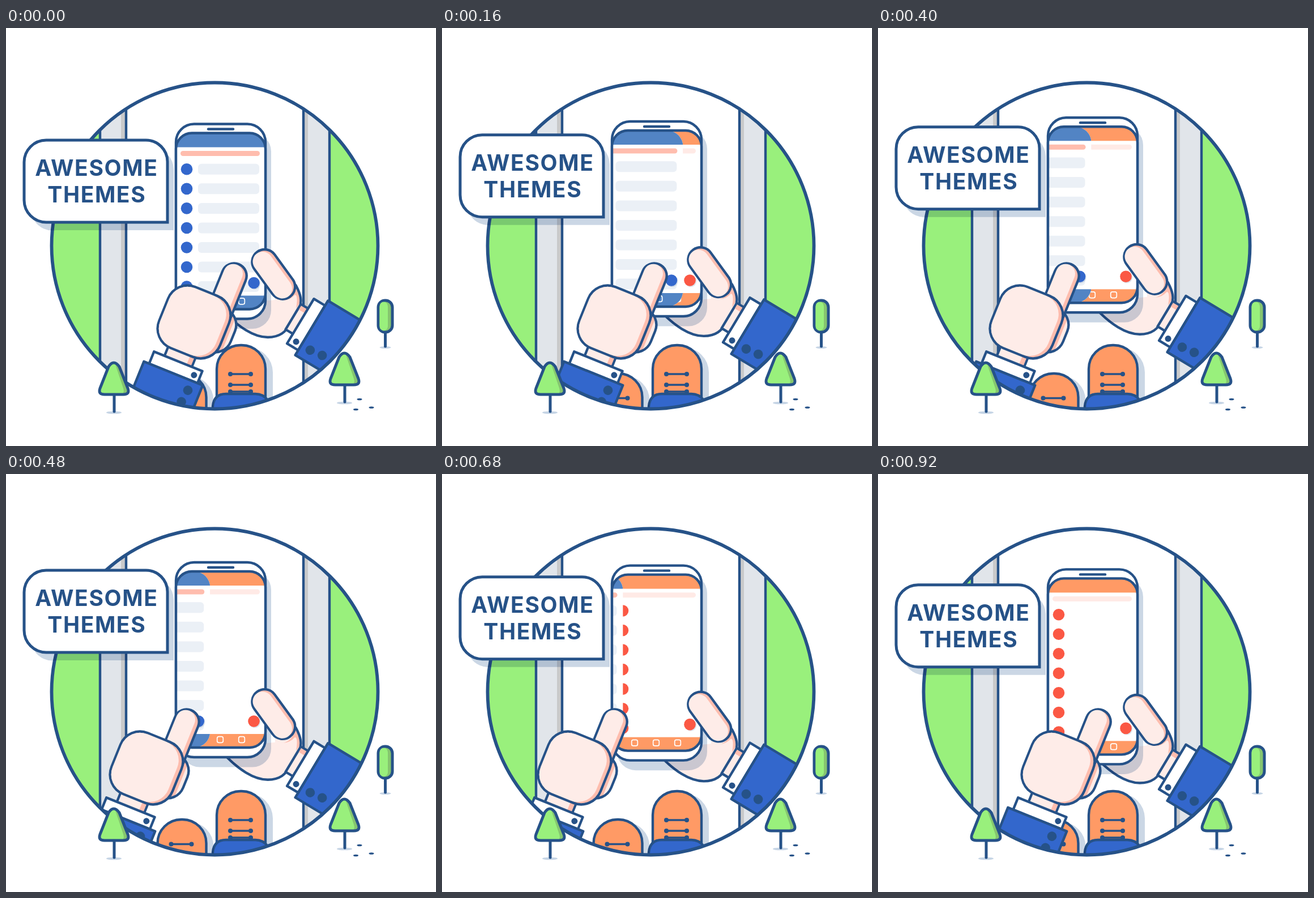
An HTML page that plays this animation: 759x738 px, repeating every 0.96 s.

```html
<!DOCTYPE html>
<html lang="en">
<head>
<meta charset="utf-8">
<title>Awesome themes</title>
<style>
  html, body { margin: 0; width: 100%; height: 100%; overflow: hidden; background: #fff; }
  svg { display: block; width: 759px; height: 738px; }
  .ink { stroke: #265288; stroke-width: 4.4; stroke-linejoin: round; stroke-linecap: round; }
  .bold { stroke-width: 5; }
  .fine { stroke-width: 3.4; }
  .dark { fill: #265288; }
  .shadow { fill: #cbd7e5; mix-blend-mode: multiply; }
  .green { fill: #99f07c; }
  .leafShade { fill: #85c56f; }
  .skin { fill: #feece8; }
  .blush { fill: #ffbdae; }
  .blue { fill: #3367cc; }
  .shoe { fill: #ff9a65; }
  .white { fill: #fff; }
  .none { fill: none; }
  text { font: 700 39px Inter, "Open Sans", sans-serif; letter-spacing: 1.6px; text-anchor: middle; }
</style>
</head>
<body>
<svg viewBox="0 0 759 738">
  <defs>
    <clipPath id="disc"><circle cx="368.5" cy="384.5" r="288"/></clipPath>
    <clipPath id="screen"><rect x="300" y="185.5" width="158" height="311" rx="28"/></clipPath>
    <clipPath id="knuckle"><rect x="10" y="-42" width="63" height="80" rx="30"/></clipPath>
    <g id="arm">
      <rect class="white ink" x="-46" y="-23" width="92" height="23"/>
      <circle class="dark" cx="35" cy="-11" r="5.5"/>
      <rect class="blue ink" x="-56" width="112" height="130"/>
      <circle class="dark" cx="35" cy="18" r="8.3"/>
      <circle class="dark" cx="32" cy="41" r="8.3"/>
    </g>
    <g id="lace">
      <path class="ink fine" d="M396 0H432"/>
      <circle class="dark" cx="396" r="4"/><circle class="dark" cx="432" r="4"/>
    </g>
    <g id="shoe">
      <path class="shadow" d="M384 690V608A43 43 0 0 1 471 608V690Z"/>
      <path class="shoe ink" d="M372 690V602A42 42 0 0 1 414 560H416A42 42 0 0 1 458 602V690Z"/>
    </g>
    <g id="tree">
      <ellipse cx="190.5" cy="679" rx="13.5" ry="2.3" fill="#c5d4e5"/>
      <path class="ink bold" d="M191 648V677"/>
      <path class="green" d="M181 598Q190 584 200 598L215 636Q219 647 207 647H174Q162 647 166 636Z"/>
      <path class="leafShade" d="M192 591Q197 592 200 598L215 636Q219 647 207 647H203Q210 645 207 636Z"/>
      <path class="none ink bold" d="M181 598Q190 584 200 598L215 636Q219 647 207 647H174Q162 647 166 636Z"/>
    </g>
  </defs>

  <g clip-path="url(#disc)">
    <rect class="white" width="759" height="738"/>
    <path class="green" d="M60 90H166V690H60ZM571 90H670V690H571Z"/>
    <path fill="#e1e5ea" d="M166 90H212V690H166ZM525 90H571V690H525Z"/>
    <path fill="#c9c9ca" d="M203 90H211V690H203ZM526 90H533V690H526Z"/>
    <path class="ink" d="M166 90V690M212 90V690M525 90V690M571 90V690"/>

    <use href="#shoe"/>
    <use href="#lace" y="611"/><use href="#lace" y="630"/><use href="#lace" y="642"/>
    <path class="blue ink" d="M365 685V668Q367 646 388 646H440Q454 646 462 657V685Z"/>
    <g transform="translate(-104.5 50)">
      <use href="#shoe"/><use href="#lace" y="603.5"/><use href="#lace" y="622.5"/>
    </g>

    <g id="palm">
      <path class="skin" d="M375 490C410 531 440 546 462 546C484 546 494 536 502 522L518 494C523 482 520 470 512 455L475 410V480Z"/>
      <path class="blush" d="M490 481Q513 475 506 444L514 458Q521 472 518 486L512 495Q516 472 510 471Q502 480 490 481Z"/>
      <path class="none ink" d="M375 490C410 531 440 546 462 546C484 546 494 536 502 522L518 494C523 482 520 470 512 455L475 410"/>
      <g transform="translate(539.5 529.5) rotate(-59)">
        <rect class="skin ink" x="-26" y="-38" width="52" height="20"/>
        <rect class="blush" x="16" y="-36" width="8" height="18"/>
        <use href="#arm" transform="scale(-1 1)"/>
      </g>
    </g>

    <g id="phone">
      <rect class="shadow" x="309" y="185" width="159" height="346" rx="33"/>
      <rect class="white ink" x="300" y="169.5" width="158" height="344" rx="32"/>
      <g clip-path="url(#screen)">
        <g id="newPage"></g>
        <g id="oldPage"><g id="oldBody" clip-path="url(#screen)"></g></g>
      </g>
      <rect class="none ink" x="300" y="185.5" width="158" height="311" rx="28"/>
      <path class="ink" d="M357 178.5H401"/>
    </g>

    <g id="thumb">
      <g transform="translate(472.3 434.8) rotate(-36)">
        <rect class="blush ink" x="-22" y="-49" width="44" height="98" rx="22"/>
        <rect class="skin" x="-20" y="-47" width="35" height="94" rx="18"/>
      </g>
    </g>

    <g id="hand">
      <g transform="translate(332 519) rotate(22)">
        <rect class="skin" x="10" y="-42" width="63" height="80" rx="30"/>
        <path class="blush" clip-path="url(#knuckle)" d="M50 -50H65V25Q64 42 48 50H30Z"/>
        <rect class="none ink" x="10" y="-42" width="63" height="80" rx="30"/>
        <rect class="blush ink" x="13" y="-124" width="44" height="120" rx="22"/>
        <rect class="skin" x="15" y="-122" width="34" height="110" rx="17"/>
        <rect class="skin ink" x="-26" y="45" width="52" height="31"/>
        <rect class="blush" x="16" y="45" width="8" height="29"/>
        <rect class="blush ink" x="-58" y="-58" width="116" height="116" rx="37"/>
        <rect class="skin" x="-56" y="-56" width="106" height="112" rx="35"/>
        <use href="#arm" y="98"/>
      </g>
    </g>
  </g>
  <circle class="none ink" style="stroke-width:5.8" cx="368.5" cy="384.5" r="288"/>

  <use href="#tree"/>
  <use href="#tree" x="407" y="-17"/>
  <ellipse cx="669.5" cy="564" rx="10" ry="2" fill="#c5d4e5"/>
  <path class="ink bold" d="M669.5 538V562"/>
  <rect class="leafShade ink bold" x="657" y="481" width="25" height="56" rx="12"/>
  <rect class="green" x="659.4" y="483.4" width="14.6" height="51" rx="8"/>
  <g class="dark">
    <ellipse cx="624" cy="655.5" rx="4.5" ry="1.8"/>
    <ellipse cx="617.5" cy="673.5" rx="4.5" ry="1.8"/>
    <ellipse cx="645" cy="670" rx="4.5" ry="1.8"/>
  </g>

  <g id="bubble">
    <path class="shadow" d="M82 212H257A38 38 0 0 1 296 250V357H88A38 38 0 0 1 50 340V250Z"/>
    <path class="white ink bold" style="stroke-linejoin:miter" d="M71 198H247A38 38 0 0 1 285 236V343H71A39 39 0 0 1 32 304V237A39 39 0 0 1 71 198Z"/>
    <text class="dark" x="159.8" y="261">AWESOME</text>
    <text class="dark" x="160.3" y="308">THEMES</text>
  </g>
</svg>
<script>
  const LOOP = 960, STEP = 40;
  const el = id => document.getElementById(id);
  const rect = (x, y, w, h, r, fill, extra = '') =>
    `<rect x="${x}" y="${y}" width="${w}" height="${h}" rx="${r}" fill="${fill}" ${extra}/>`;
  const dot = (x, y, fill) => `<circle cx="${x}" cy="${y}" r="10.3" fill="${fill}"/>`;

  function page(bar, title, accent, line) {
    let out = rect(300, 185, 158, 312, 0, '#fff') + rect(308, 217, 140, 9, 4.5, title);
    for (let i = 0; i < 7; i++) {
      const y = 249.3 + i * 34.55;
      out += dot(319, y, accent) + rect(339, y - 9.5, 108, 19, 6, line);
    }
    out += rect(300, 185, 158, 25.5, 0, bar) + rect(300, 472.5, 158, 24, 0, bar);
    for (const x of [340, 378, 416])
      out += rect(x - 5.3, 477.2, 10.6, 10.6, 3, 'none', 'stroke="#fff" stroke-width="1.7"');
    return out + dot(439, 451.5, '#26528826') + dot(437.5, 450, accent);
  }
  el('newPage').innerHTML = page('#ff9a65', '#ffeae6', '#fb5844', '#fff');
  el('oldBody').innerHTML = page('#5284c4', '#ffbdae', '#3367cc', '#ebf0f6');

  const move = (id, x, y) => el(id).setAttribute('transform', `translate(${x} ${y})`);

  function draw() {
    const t = Math.floor(performance.now() % LOOP / STEP) * STEP;
    const lift = 1 - Math.abs(t / 480 - 1);
    const swipe = t < 560 ? t / 560 : Math.min(1, (LOOP - t) / 280);
    move('bubble', 0, -28 * lift);
    move('phone', 0, -13.5 * lift);
    move('thumb', 0, -10.8 * lift);
    move('palm', 0, -6.3 * lift);
    move('hand', -98 * swipe, 0);
    move('oldPage', -0.2036 * t, 0);
    requestAnimationFrame(draw);
  }
  draw();
</script>
</body>
</html>
```
